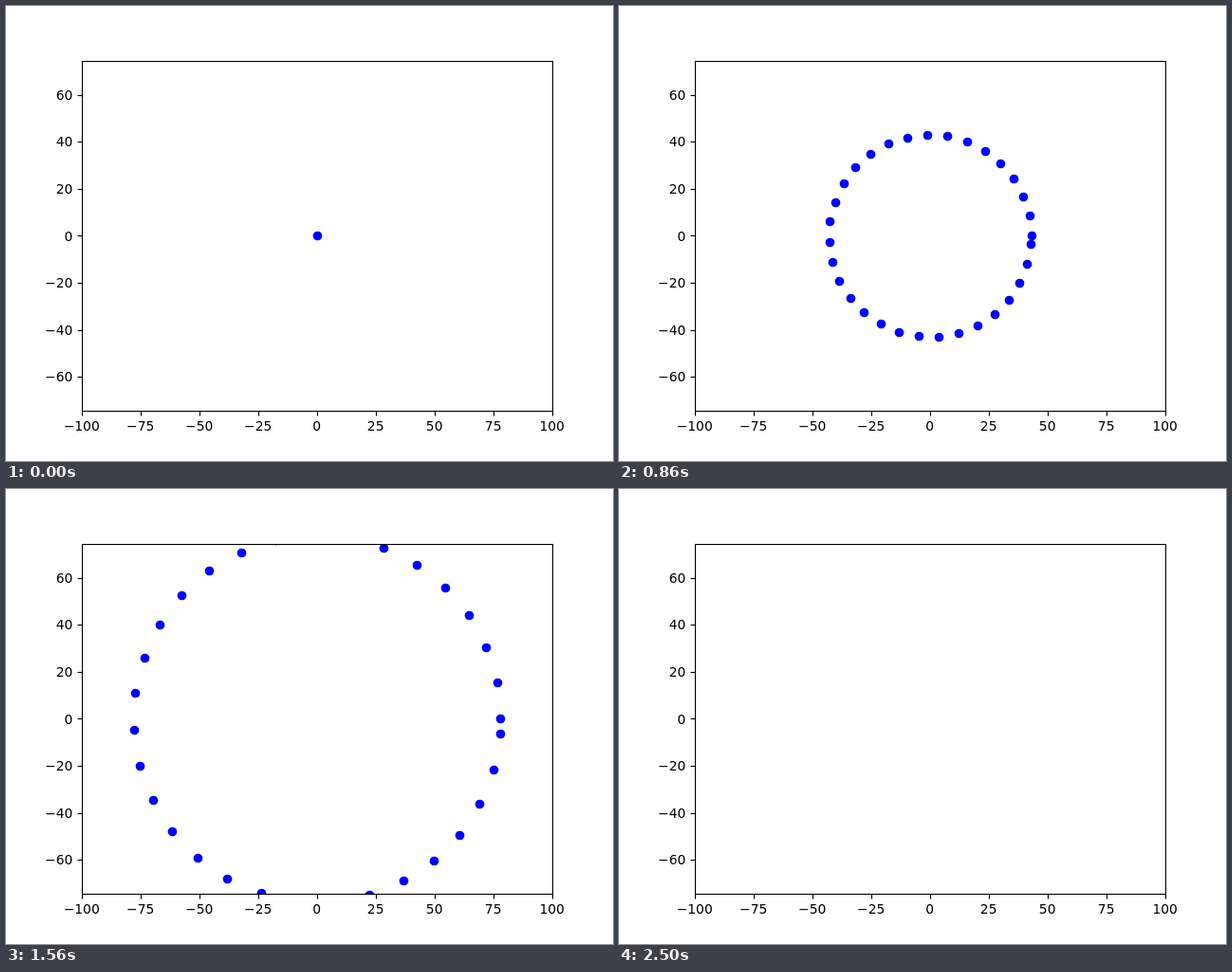
An HTML page with a canvas that plays this animation: 640x480 px, repeating every 2640 ms.

```html
<!DOCTYPE html>
<html lang="en">
<head>
<meta charset="utf-8">
<title>Expanding ring</title>
<style>
html, body { margin: 0; overflow: hidden; background: #fff; }
canvas { display: block; }
</style>
</head>
<body>
<canvas id="plot" width="640" height="480"></canvas>
<script>
const ctx = document.getElementById("plot").getContext("2d");

const LOOP = 2640, STEP = 20, LAST_RADIUS = 125;
const SCALE = 2.48;
const LEFT = 80.5, RIGHT = 576.5, TOP = 58.5, BOTTOM = 427.5;

const px = x => 328 + x * SCALE;
const py = y => 242.4 - y * SCALE;
const snap = v => Math.floor(v + 0.5) + 0.5;
const label = n => String(n).replace("-", "\u2212");

function line(x1, y1, x2, y2) {
  ctx.beginPath();
  ctx.moveTo(x1, y1);
  ctx.lineTo(x2, y2);
  ctx.stroke();
}

function drawAxes() {
  ctx.strokeStyle = ctx.fillStyle = "#000";
  ctx.lineWidth = 1.11;
  ctx.font = '13.89px "DejaVu Sans", sans-serif';
  ctx.strokeRect(LEFT, TOP, RIGHT - LEFT, BOTTOM - TOP);

  ctx.textAlign = "center";
  for (let x = -100; x <= 100; x += 25) {
    line(snap(px(x)), BOTTOM, snap(px(x)), BOTTOM + 5);
    ctx.fillText(label(x), px(x) - 0.3, 448);
  }
  ctx.textAlign = "right";
  for (let y = -60; y <= 60; y += 20) {
    line(LEFT - 5, snap(py(y)), LEFT, snap(py(y)));
    ctx.fillText(label(y), 70.3, Math.round(py(y) + 5.2));
  }
}

function drawRing(radius) {
  ctx.save();
  ctx.beginPath();
  ctx.rect(80, 58, 497, 370);
  ctx.clip();
  ctx.fillStyle = "#00f";
  for (let i = 0; i < 32; i++) {
    const angle = i * 0.2;
    const x = snap(px(radius * Math.cos(angle)));
    const y = snap(py(radius * Math.sin(angle)));
    ctx.beginPath();
    ctx.arc(x, y, 4.86, 0, 2 * Math.PI);
    ctx.fill();
    // All markers coincide at the centre, so one is enough.
    if (radius === 0) break;
  }
  ctx.restore();
}

function draw() {
  const time = performance.now() % LOOP;
  ctx.fillStyle = "#fff";
  ctx.fillRect(0, 0, 640, 480);
  drawRing(Math.min(Math.floor(time / STEP), LAST_RADIUS));
  drawAxes();
  requestAnimationFrame(draw);
}
draw();
</script>
</body>
</html>
```
